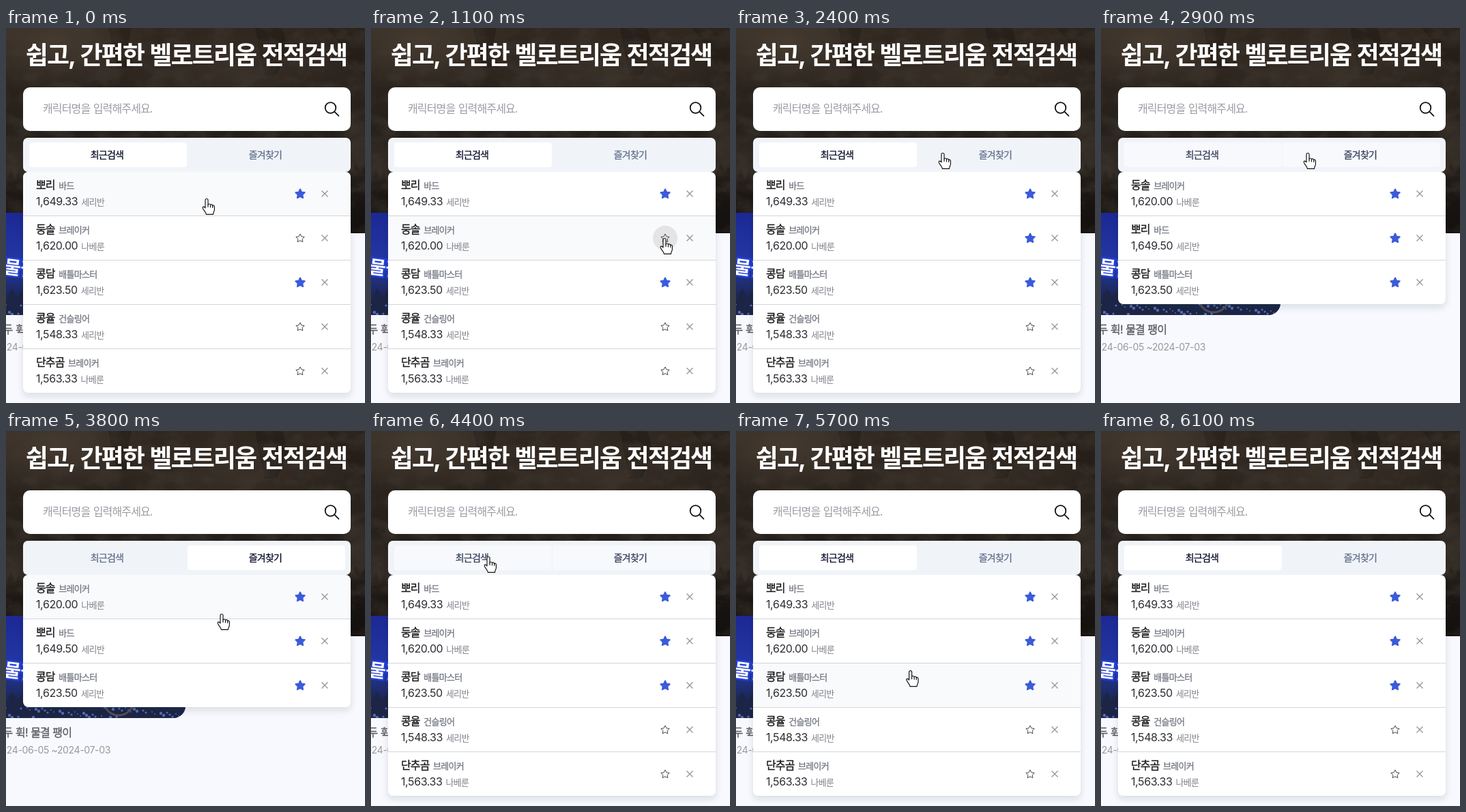
Recreate the animation shown at these times as an HTML page. Size 526 px wide and 550 px high, loop 6.31 s.

```html
<!DOCTYPE html>
<html lang="ko">
<head>
<meta charset="utf-8">
<title>전적검색</title>
<style>
  html, body { margin: 0; width: 100%; height: 100%; overflow: hidden; background: #f8f9fe; }
  svg { display: block; width: 526px; height: 550px; }
  text { font-family: Inter, "Noto Sans CJK KR", "Noto Sans CJK", sans-serif; white-space: pre; }
  .ko { letter-spacing: -.054em; word-spacing: .05em; }
  .num { letter-spacing: -.025em; }
  .medium { fill: currentColor; stroke: currentColor; stroke-width: .3px; }
  .title { font-size: 36px; font-weight: 700; fill: #fff; }
  .hint { font-size: 16px; fill: #9a9ca3; }
  .tab { font-size: 14px; }
  .name { font-size: 16px; color: #18181b; }
  .job { font-size: 13px; color: #747884; }
  .level { font-size: 16px; fill: #2c2d33; }
  .server { font-size: 13px; fill: #81838b; }
  .event { font-size: 16px; color: #5a5a5e; }
  .date { font-size: 14px; fill: #98989c; }
  .banner { font-size: 27px; font-weight: 900; fill: #fff; stroke: #2440d8; stroke-width: 5px; paint-order: stroke; }
  .star { stroke-linejoin: round; }
</style>
</head>
<body>
<svg viewBox="0 0 526 550" lang="ko">
  <defs>
    <linearGradient id="ruins" x1="0" y1="0" x2="0" y2="1">
      <stop offset="0" stop-color="#30271f"/>
      <stop offset=".3" stop-color="#2a231d"/>
      <stop offset=".6" stop-color="#231e1a"/>
      <stop offset="1" stop-color="#14110f"/>
    </linearGradient>
    <radialGradient id="smoke">
      <stop offset="0" stop-color="#625446" stop-opacity=".45"/>
      <stop offset="1" stop-color="#625446" stop-opacity="0"/>
    </radialGradient>
    <linearGradient id="night" x1="0" y1="0" x2="0" y2="1">
      <stop offset="0" stop-color="#1c2894"/>
      <stop offset=".5" stop-color="#2338a4"/>
      <stop offset=".8" stop-color="#1c2859"/>
      <stop offset="1" stop-color="#2b3562"/>
    </linearGradient>
    <filter id="rock" x="0" y="0" width="100%" height="100%">
      <feTurbulence type="fractalNoise" baseFrequency=".03 .05" numOctaves="4" seed="4"/>
      <feColorMatrix values="0 0 0 0 .05  0 0 0 0 .04  0 0 0 0 .03  3 0 0 0 -1.2"/>
    </filter>
    <filter id="soft" x="-10%" y="-10%" width="120%" height="125%">
      <feDropShadow dx="0" dy="5" stdDeviation="5" flood-color="#1e293b" flood-opacity=".13"/>
    </filter>
    <clipPath id="panelClip"><rect class="panelShape" x="25" y="211" width="480" rx="8"/></clipPath>
    <clipPath id="cardClip"><path d="M0 271H263V403a18 18 0 0 1-18 18H0Z"/></clipPath>
  </defs>

  <rect width="526" height="550" fill="#f8f9fe"/>
  <rect width="526" height="301" fill="url(#ruins)"/>
  <ellipse cx="70" cy="20" rx="150" ry="75" fill="url(#smoke)"/>
  <ellipse cx="330" cy="65" rx="170" ry="60" fill="url(#smoke)" opacity=".5"/>
  <ellipse cx="10" cy="205" rx="50" ry="60" fill="url(#smoke)" opacity=".7"/>
  <ellipse cx="515" cy="185" rx="40" ry="70" fill="url(#smoke)" opacity=".7"/>
  <g fill="#15100d" opacity=".3">
    <path d="M150 0h34l-5 24 8 34h-24l-6-25ZM365 0h40l8 30-16 40h-18l-8-38ZM470 0h56v70l-22-16-14-30Z"/>
    <path d="M0 225l8-20 5 18 6-11 8 22v37H0ZM505 215l8-18 5 15 8-9v98h-21Z"/>
  </g>
  <rect width="526" height="301" filter="url(#rock)" opacity=".5"/>

  <g clip-path="url(#cardClip)">
    <rect y="271" width="263" height="150" fill="url(#night)"/>
    <path d="M0 398l9-16 7 12 9-9 30 20 40-7 50 9 60-9 58 8v15H0Z" fill="#1d2546"/>
    <circle cx="165" cy="395" r="22" fill="none" stroke="#544f56" stroke-width="3"/>
    <g id="flowers" fill="#566cb4"></g>
    <text class="banner ko" x="-3" y="361" transform="rotate(7 10 352)">물결</text>
  </g>
  <text class="event medium ko" x="96" y="448" text-anchor="end">모두 휙! 물결 팽이</text>
  <text class="date num" x="153" y="473" text-anchor="end">2024-06-05 ~2024-07-03</text>

  <text class="title ko" x="264" y="53" text-anchor="middle">쉽고, 간편한 벨로트리움 전적검색</text>
  <rect x="25" y="87" width="480" height="64" rx="10" fill="#fff"/>
  <text class="hint ko" x="54" y="124">캐릭터명을 입력해주세요.</text>
  <g fill="none" stroke="#111217" stroke-width="1.8" stroke-linecap="round">
    <circle cx="475.5" cy="117" r="7.8"/><path d="M481.2 122.7l6.2 6.2"/>
  </g>

  <rect class="panelShape" x="25" y="211" width="480" rx="8" fill="#fff" filter="url(#soft)"/>
  <rect x="25" y="161" width="480" height="50" rx="7" fill="#f0f4f9"/>
  <rect id="pillLeft" x="34" y="168" width="231" height="36" rx="4" fill="#fff"/>
  <rect id="pillRight" x="266" y="168" width="231" height="36" rx="4" fill="#fff"/>
  <text id="tabLeft" class="tab medium ko" x="148" y="191" text-anchor="middle">최근검색</text>
  <text id="tabRight" class="tab medium ko" x="380" y="191" text-anchor="middle">즐겨찾기</text>

  <g clip-path="url(#panelClip)">
    <rect id="hover" x="25" width="480" height="64" fill="#f9fafb"/>
    <circle id="halo" cx="431" r="18" fill="#e4e4e6"/>
    <g id="recent"></g>
    <g id="favorites"></g>
  </g>

  <g id="hand" fill="#fff" stroke="#111" stroke-width="1.15" stroke-linejoin="round" stroke-linecap="round">
    <path d="M-2 14V2.4C-2-.2 2-.2 2 2.4V9.5C2 7.5 5.4 7.5 5.5 9.8C5.8 8.2 8.6 8.5 8.7 10.7C9.2 9.6 11.4 10.1 11.4 12V16.5C11.4 19 9.6 20 9.4 23.4H-.6C-.8 20.8-3.6 18.6-5.6 14.4C-6.6 12-4 11-2 14Z"/>
    <path fill="none" d="M2 9.5V12.5M5.5 9.8V13M8.7 10.7V13.5"/>
  </g>
</svg>
<script>
const LOOP = 6310, STEP = 100, TOP = 211, PITCH = 65;
const $ = id => document.getElementById(id);
const clamp = v => Math.max(0, Math.min(1, v));
const show = (el, on) => el.setAttribute('visibility', on ? 'visible' : 'hidden');

const bard = { name: '뽀리', job: '바드', level: '1,649.33', server: '세리반' };
const breaker = { name: '둥솔', job: '브레이커', level: '1,620.00', server: '나베룬' };
const master = { name: '콩담', job: '배틀마스터', level: '1,623.50', server: '세리반' };
const gunner = { name: '콩율', job: '건슬링어', level: '1,548.33', server: '세리반' };
const pocket = { name: '단추곰', job: '브레이커', level: '1,563.33', server: '나베룬' };
const recentList = [bard, breaker, master, gunner, pocket];
const favoriteList = [breaker, { ...bard, level: '1,649.50' }, master];

// Time and fingertip position of the pointer.
const pointerPath = [
  [0, 294, 250], [300, 294, 250], [600, 372, 290], [700, 372, 290],
  [1100, 430, 308], [1700, 430, 308], [2000, 272, 277], [2400, 303, 183],
  [3000, 303, 183], [3300, 320, 296], [3700, 320, 296], [3800, 316, 268],
  [4100, 172, 184], [4500, 172, 184], [4900, 246, 276], [5000, 250, 288],
  [5100, 252, 294], [5600, 252, 294], [6100, 270, 580], [LOOP, 270, 580]
];

function starPoints(cx, cy, r) {
  return Array.from({ length: 10 }, (_, i) => {
    const a = (i / 5 - .5) * Math.PI, d = i % 2 ? r * .5 : r;
    return `${(cx + d * Math.cos(a)).toFixed(2)},${(cy + d * Math.sin(a)).toFixed(2)}`;
  }).join(' ');
}

function star(y, filled) {
  return filled
    ? `<polygon class="star" points="${starPoints(431, y + .5, 7)}" fill="#3b5bdb" stroke="#3b5bdb" stroke-width="2"/>`
    : `<polygon class="star" points="${starPoints(431, y + .5, 6.5)}" fill="none" stroke="#48484c" stroke-width="1"/>`;
}

function row({ name, job, level, server }, i, filled, last) {
  const y = TOP + i * PITCH, mid = y + 32;
  return `<text x="44" y="${y + 25}"><tspan class="name medium ko">${name}</tspan><tspan class="job medium ko" dx="5.5">${job}</tspan></text>
    <text x="44" y="${y + 49}"><tspan class="level num">${level}</tspan><tspan class="server ko" dx="5">${server}</tspan></text>
    <g class="mark">${star(mid, filled)}</g>
    <path d="M462.5 ${mid - 4.5}l9 9m0-9l-9 9" stroke="#97989c" stroke-width="1.4"/>
    ${last ? '' : `<path d="M25 ${y + 64.5}h480" stroke="#d3d5d9"/>`}`;
}

$('recent').innerHTML = recentList.map((p, i) => row(p, i, p === bard || p === master, i === 4)).join('');
$('favorites').innerHTML = favoriteList.map((p, i) => row(p, i, true, i === 2)).join('');
$('flowers').innerHTML = Array.from({ length: 50 }, (_, i) =>
  `<circle cx="${i * 61 % 257}" cy="${406 + i * 7 % 15}" r="${1 + i % 3 * .6}"/>`).join('');
const secondMark = $('recent').querySelectorAll('.mark')[1];
const panelShapes = document.querySelectorAll('.panelShape');

function pointerAt(t) {
  const i = pointerPath.findIndex(k => k[0] > t);
  const [t0, x0, y0] = pointerPath[i - 1], [t1, x1, y1] = pointerPath[i];
  const p = (t - t0) / (t1 - t0);
  return [x0 + (x1 - x0) * p, y0 + (y1 - y0) * p];
}

function mix(from, to, p) {
  return `rgb(${from.map((c, i) => Math.round(c + (to[i] - c) * p))})`;
}

let secondStarred;
function render(ms) {
  const t = Math.floor(ms / STEP) * STEP;
  const [x, y] = pointerAt(t);
  const favoritesOpen = t >= 2900 && t < 4400;
  const count = favoritesOpen ? 3 : 5;

  const right = clamp((t - 2800) / 200) - clamp((t - 4300) / 200);
  const idle = [100, 112, 139], active = [12, 18, 44];
  $('pillLeft').setAttribute('opacity', 1 - right);
  $('pillRight').setAttribute('opacity', right);
  $('tabLeft').setAttribute('color', mix(active, idle, right));
  $('tabRight').setAttribute('color', mix(idle, active, right));

  panelShapes.forEach(el => el.setAttribute('height', count * PITCH - 1));
  show($('recent'), !favoritesOpen);
  show($('favorites'), favoritesOpen);

  const starred = t >= 1700;
  if (starred !== secondStarred) {
    secondMark.innerHTML = star(TOP + PITCH + 32, starred);
    secondStarred = starred;
  }

  const hovered = Math.floor((y - TOP) / PITCH);
  const inList = hovered >= 0 && hovered < count;
  const mid = TOP + hovered * PITCH + 32;
  show($('hover'), inList);
  $('hover').setAttribute('y', TOP + hovered * PITCH);
  show($('halo'), inList && Math.hypot(x - 431, y - mid) < 18);
  $('halo').setAttribute('cy', mid);
  $('hand').setAttribute('transform', `translate(${x.toFixed(1)} ${y.toFixed(1)})`);
}

function tick() {
  render(performance.now() % LOOP);
  requestAnimationFrame(tick);
}
tick();
</script>
</body>
</html>
```
